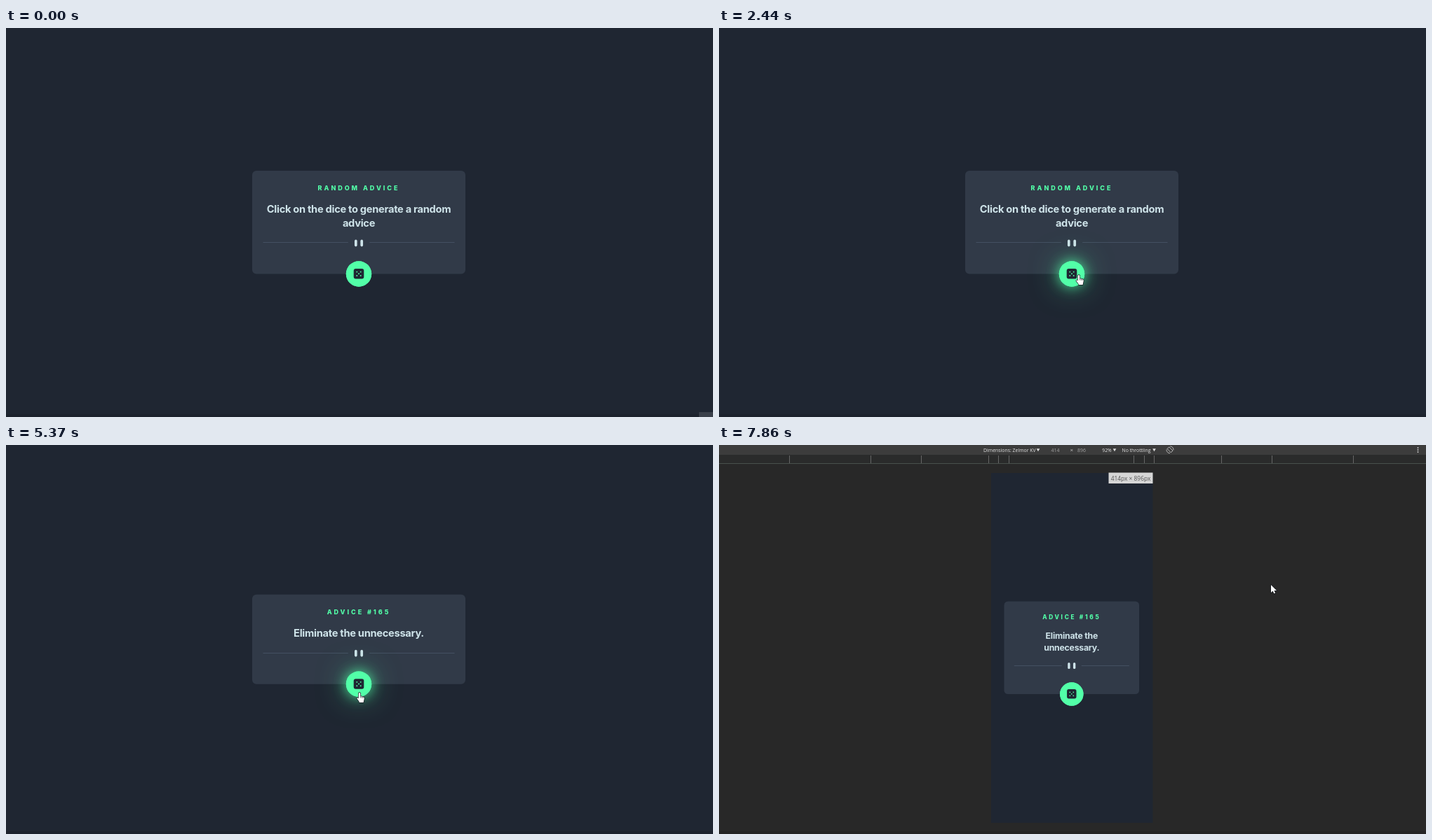
These frames come from a looping animation (1008 by 556 pixels, 7990 ms). An HTML page with a canvas:

```html
<!DOCTYPE html>
<html lang="en">
<head>
<meta charset="utf-8">
<title>Random advice</title>
<style>
  html, body { margin: 0; width: 100%; height: 100%; overflow: hidden; background: #1f2632; }
  canvas { display: block; }
</style>
</head>
<body>
<canvas id="stage" width="1008" height="556"></canvas>
<script>
const ctx = document.getElementById('stage').getContext('2d');
const LOOP = 7990, FADE = 450;
const NIGHT = '#1f2632', SLATE = '#313a48', CYAN = '#cee3e9', NEON = '#52ffa8';

const DESKTOP = { x: 503, y: 277.75, width: 304, scale: 1, size: 14.65 };
const PHONE = { x: 502.8, y: 289.75, width: 192.6, scale: 0.92, size: 12.3 };

const SCENES = [
  { from: 0, layout: DESKTOP, label: 'RANDOM ADVICE', lines: ['Click on the dice to generate a random', 'advice'] },
  { from: 3120, layout: DESKTOP, label: 'ADVICE #113', lines: ['Lemon and salt works wonders on', 'tarnished brass.'] },
  { from: 5370, layout: DESKTOP, label: 'ADVICE #165', lines: ['Eliminate the unnecessary.'] },
  { from: 7460, layout: PHONE, label: 'ADVICE #165', lines: ['Eliminate the', 'unnecessary.'] }
];

// Pointer strokes: cubic curves, eased, then held until the next one starts
const STROKES = [
  { from: 70, to: 1200, path: [[1003, 548], [800, 520], [640, 280], [513, 353]] },
  { from: 4050, to: 4830, path: [[522, 370], [580, 450], [640, 410], [504, 354]] },
  { from: 5640, to: 6460, path: [[504, 354], [800, 360], [980, 365], [912, 270]] },
  { from: 6460, to: 6800, path: [[912, 270], [915, 150], [950, 95], [1012, 92]] },
  { from: 7720, to: 7860, path: [[966, 111], [906, 141], [847, 170], [787, 200]] }
];
const HOVERS = [[1130, 4050], [4750, 5700]];

const ARROW = new Path2D('M0 0V11L2.6 8.6 4.3 12.3 6.1 11.5 4.5 8H8Z');
const HAND = new Path2D('M-1.3 1Q0-.9 1.3 1V5L5.5 6Q7 6.4 6.8 8.5L6 12 5.6 14H-.2L-.6 12.4-3.6 8.6Q-3.7 7-2.2 7.4L-1.3 8.4Z');

const clamp = v => Math.min(1, Math.max(0, v));
const smooth = v => v * v * (3 - 2 * v);
const easeOut = v => Math.sin(clamp(v) * Math.PI / 2);

function bezier([a, b, c, d], p) {
  const q = 1 - p;
  return [0, 1].map(i => q ** 3 * a[i] + 3 * q * q * p * b[i] + 3 * q * p * p * c[i] + p ** 3 * d[i]);
}

function glowAt(t) {
  return Math.max(...HOVERS.map(([enter, leave]) => easeOut((t - enter) / FADE) * (1 - easeOut((t - leave) / FADE))));
}

function rect(color, x, y, w, h, radius = 0) {
  ctx.fillStyle = color;
  ctx.beginPath();
  ctx.roundRect(x, y, w, h, radius);
  ctx.fill();
}

function circle(color, x, y, r) {
  ctx.fillStyle = color;
  ctx.beginPath();
  ctx.arc(x, y, r, 0, 7);
  ctx.fill();
}

function text(str, x, y, font, color, align = 'center', spacing = 0) {
  ctx.font = font;
  ctx.fillStyle = color;
  ctx.textAlign = align;
  ctx.letterSpacing = spacing + 'px';
  ctx.fillText(str, x, y);
}

// Drawn around the origin, at unit scale
function button(glow) {
  for (const [blur, alpha] of [[42, 0.5], [18, 0.8]]) {
    ctx.shadowBlur = blur * glow;
    ctx.shadowColor = `rgba(82,255,168,${alpha * glow})`;
    circle(NEON, 0, 0, 18.2);
  }
  ctx.shadowColor = 'transparent';
  rect(NIGHT, -7.3, -7.5, 14.6, 14.6, 3);
  circle(NEON, 0, -0.2, 0.95);
  for (const dx of [-2.7, 2.7])
    for (const dy of [-2.9, 2.5]) circle(NEON, dx, dy, 0.95);
}

function card({ layout, label, lines }, glow) {
  const { x, width, scale: k, size } = layout;
  const line = size * 1.33;
  const height = 108.5 * k + lines.length * line;
  const top = layout.y - height / 2, bottom = top + height;

  rect(SLATE, x - width / 2, top, width, height, 6 * k);
  text(label, x, top + 28 * k, `800 ${9 * k}px Inter, sans-serif`, NEON, 'center', 2.95 * k);
  lines.forEach((str, i) =>
    text(str, x, top + 41 * k + size * 1.3 + i * line, `700 ${size}px Inter, sans-serif`, CYAN, 'center', -0.02 * size));

  const quoteY = bottom - 44 * k, gap = 15.2 * k, rule = width / 2 - 15.5 * k - gap;
  for (const start of [x - gap - rule, x + gap])
    rect('#445062', start, Math.floor(quoteY - 0.5), rule, 1);
  for (const side of [-1, 1])
    rect(CYAN, x + (side * 4.2 - 1.85) * k, quoteY - 4.9 * k, 3.7 * k, 9.8 * k, 1.8 * k);

  ctx.save();
  ctx.translate(x, bottom);
  ctx.scale(k, k);
  button(glow);
  ctx.restore();
  return bottom;
}

function caret(x) {
  ctx.fillStyle = '#ddd';
  ctx.fill(new Path2D(`M${x - 2.3} 5.2h4.6l-2.3 4z`));
}

function devtools() {
  rect('#282828', 0, 0, 1008, 556);
  rect('#3c3c3c', 0, 0, 1008, 14);
  rect('#2a2b2b', 0, 14, 1008, 12);
  rect('#48504c', 0, 26, 1008, 1);
  for (const d of [89, 104, 118, 214, 286, 402])
    for (const side of [-1, 1]) rect('#666', Math.floor(502.9 + side * d), 15, 1, 11);

  const font = '6.9px "Open Sans", sans-serif', bright = '#e2e2e2', dim = '#a2a2a2';
  text('Dimensions: Zelmor KV', 377, 9.6, font, bright, 'left');
  text('414', 479.5, 9.6, font, dim);
  text('×', 502.7, 10, '8px "Open Sans", sans-serif', '#c4c4c4');
  text('896', 517, 9.6, font, dim);
  text('92%', 553, 9.6, font, bright);
  text('No throttling', 574.5, 9.6, font, bright, 'left');
  [455, 564, 620.5].forEach(caret);

  // Rotate icon
  ctx.save();
  ctx.translate(643, 6.8);
  ctx.strokeStyle = '#c4c4c4';
  ctx.lineWidth = 0.9;
  ctx.beginPath();
  ctx.arc(0, 0, 5, -1.5, 0.1);
  ctx.moveTo(0, 5);
  ctx.arc(0, 0, 5, 1.6, 3.2);
  ctx.stroke();
  ctx.rotate(-Math.PI / 4);
  ctx.strokeRect(-1.9, -3.7, 3.8, 7.4);
  ctx.restore();
  for (const y of [4, 7, 10]) circle('#d0d0d0', 996.5, y, 0.9);

  rect(NIGHT, 388, 40, 230.5, 500);
  rect('#d6d6d6', 555.5, 39.5, 63, 15.5);
  text('414px × 896px', 587, 50.5, '8.4px "Open Sans", sans-serif', '#555');
}

function pointer(t, buttonY) {
  const stroke = STROKES.findLast(s => t >= s.from);
  if (!stroke) return;
  const [x, y] = bezier(stroke.path, smooth(clamp((t - stroke.from) / (stroke.to - stroke.from))));
  const shape = Math.hypot(x - 503, y - buttonY) < 18.2 ? HAND : ARROW;
  ctx.save();
  ctx.translate(x, y);
  ctx.lineJoin = 'round';
  ctx.lineWidth = 1.4;
  ctx.strokeStyle = '#16191f';
  ctx.stroke(shape);
  ctx.fillStyle = '#fff';
  ctx.fill(shape);
  if (shape === HAND) {
    ctx.lineWidth = 0.6;
    ctx.stroke(new Path2D('M1.3 5V7.5M3.2 5.6V7.8M5 6V8'));
  }
  ctx.restore();
}

function draw(now) {
  const t = now % LOOP;
  const scene = SCENES.findLast(s => t >= s.from);
  if (scene.layout === PHONE) devtools();
  else rect(NIGHT, 0, 0, 1008, 556);
  rect('rgba(0,0,0,.1)', 0, 552, 1008, 4);
  if (t < 70) rect('#3a404a', 988, 549, 20, 7);
  const buttonY = card(scene, glowAt(t));
  pointer(t, buttonY);
  requestAnimationFrame(draw);
}
requestAnimationFrame(draw);
</script>
</body>
</html>
```
